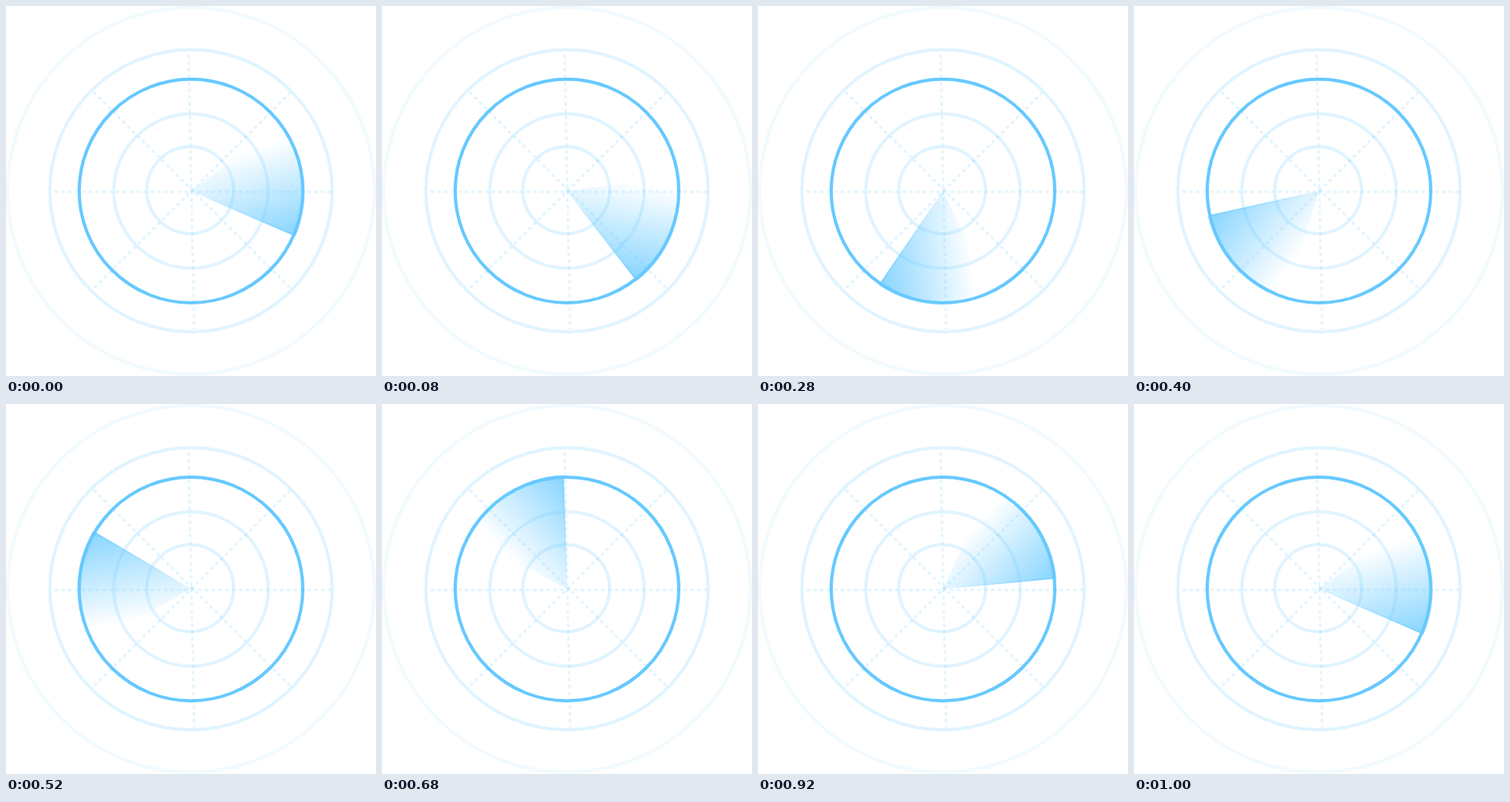
Animation, 460 px wide and 460 px high, one loop 1040 ms. Source, as an HTML page:

```html
<!DOCTYPE html>
<html lang="en">
<head>
<meta charset="utf-8">
<title>Radar sweep</title>
<style>
  html, body { margin: 0; width: 100%; height: 100%; overflow: hidden; background: #fff; }
  svg { display: block; width: 460px; height: 460px; }
</style>
</head>
<body>
<svg viewBox="0 0 460 460">
  <defs>
    <linearGradient id="fade" gradientUnits="userSpaceOnUse" x1="-17" y1="-19.4" x2="61" y2="69.6">
      <stop offset="0" stop-color="#66c9ff" stop-opacity="0"/>
      <stop offset="1" stop-color="#66c9ff" stop-opacity=".78"/>
    </linearGradient>
    <linearGradient id="edge" gradientUnits="userSpaceOnUse" x1="10" y1="0" x2="141" y2="0">
      <stop offset="0" stop-color="#66c9ff" stop-opacity="0"/>
      <stop offset="1" stop-color="#66c9ff" stop-opacity=".75"/>
    </linearGradient>
  </defs>
  <g fill="none" stroke="#66c9ff" stroke-width="4">
    <circle cx="230" cy="229.7" r="228" stroke-opacity=".09"/>
    <g stroke-opacity=".2">
      <circle cx="230" cy="229.8" r="175.5"/>
      <circle cx="230" cy="230" r="96"/>
      <circle cx="229" cy="229" r="54"/>
    </g>
    <g stroke-opacity=".19" stroke-width="3" stroke-dasharray="4.5 4">
      <path d="M60 231H406"/>
      <path d="M227 60L234 402"/>
      <path d="M109 107L354 351"/>
      <path d="M354 107L109 351"/>
    </g>
    <circle cx="230" cy="230" r="139"/>
  </g>
  <g id="sweep">
    <path d="M0 0L70.75 -122.54A141.5 141.5 0 0 1 141.5 0Z" fill="url(#fade)"/>
    <path d="M10 -1H141V1H10Z" fill="url(#edge)"/>
  </g>
</svg>
<script>
  const LOOP = 1040, STEP = 40, TURN = 14.4, START = 23.2;
  const sweep = document.getElementById('sweep');
  const begin = performance.now();

  function draw() {
    const time = (performance.now() - begin) % LOOP;
    const angle = START + TURN * Math.floor(time / STEP);
    sweep.setAttribute('transform', `translate(230 230) rotate(${angle})`);
    requestAnimationFrame(draw);
  }
  draw();
</script>
</body>
</html>
```
